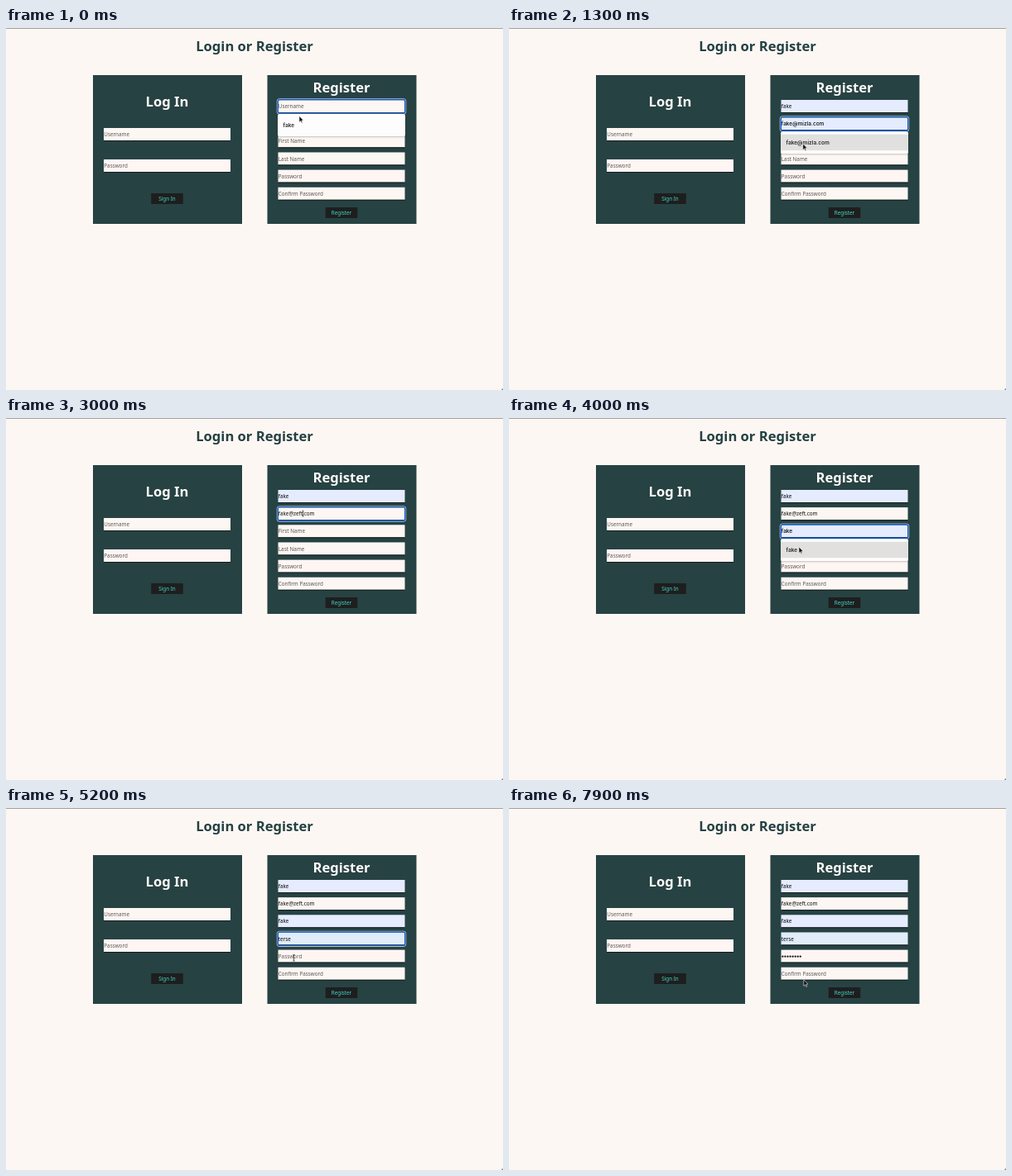
Animation, 600 px wide and 438 px high, one loop 8 s. Source, as an HTML page with a canvas:

```html
<!DOCTYPE html>
<html lang="en">
<head>
<meta charset="utf-8">
<title>Login or Register</title>
<style>
  html, body { margin: 0; width: 100%; height: 100%; overflow: hidden; background: #fdf7f4; }
  canvas { display: block; width: 600px; height: 438px; }
</style>
</head>
<body>
<canvas id="stage" width="600" height="438"></canvas>
<script>
const ctx = document.getElementById('stage').getContext('2d');
const LOOP = 8000, TICK = 100;
const PAGE = '#fdf7f4', PANEL = '#274243', AUTOFILL = '#e5ecfe';
const BODY = '"Noto Sans", "Open Sans", sans-serif';
const SYSTEM = 'Inter, Roboto, sans-serif';
const HEADING = `bold 16.6px ${BODY}`;
const FIELD_W = 153, FIELD_X = 328.5;

const NAME = 'fake', SURNAME = 'terse';
const OLD_DOMAIN = 'mizla', NEW_DOMAIN = 'zeft';

const LABELS = ['Username', 'Email', 'First Name', 'Last Name', 'Password', 'Confirm Password'];
const midOf = i => 94.5 + 21.15 * i;

// Suggestion lists: opened, hovered, accepted.
const MENUS = [
  { field: 0, open: 0, hover: 200, accept: 400, text: NAME },
  { field: 1, open: 800, hover: 1200, accept: 1500, text: `${NAME}@${OLD_DOMAIN}.com` },
  { field: 2, open: 3600, hover: 4000, accept: 4200, text: NAME },
  { field: 3, open: 4600, hover: 5000, accept: 5100, text: SURNAME }
];
const FOCUS = [[0, 0], [700, 1], [3500, 2], [4500, 3], [6000, 4], [7700, -1]];
const DELETE_TIMES = [1800, 1900, 2000, 2100, 2200];
const TYPE_TIMES = [2700, 2700, 2800, 3000];
const DOT_TIMES = [6100, 6200, 6300, 6400, 6500, 6700, 7000, 7200];

// Pointer runs as [time, x, y]; the pointer is hidden between runs.
const RUNS = [
  [[0, 354, 106.5], [200, 354, 115], [400, 354, 115], [700, 355, 114],
   [900, 355, 122], [1300, 354.8, 140], [1500, 355, 140], [1800, 368, 116], [1899, 368, 116]],
  [[3300, 366, 119], [3500, 350, 137], [3600, 350, 139], [3900, 350, 139],
   [4000, 350, 156], [4200, 350, 156], [4500, 348, 158], [4700, 347.8, 162],
   [4800, 347.5, 167], [5000, 347, 179], [5100, 347, 180], [5300, 348, 182],
   [5500, 348, 182], [5700, 349.5, 186], [6099, 349.5, 186]],
  [[7400, 349.5, 186], [7700, 356, 211], [7900, 355.8, 207.9], [8000, 355.8, 207.9]]
];

const count = (times, t) => times.filter(x => x <= t).length;

function pointerAt(t) {
  const run = RUNS.find(r => t >= r[0][0] && t <= r[r.length - 1][0]);
  if (!run) return null;
  const i = Math.max(1, run.findIndex(p => p[0] >= t));
  const [t0, x0, y0] = run[i - 1], [t1, x1, y1] = run[i];
  const k = (t - t0) / (t1 - t0);
  return { x: x0 + (x1 - x0) * k, y: y0 + (y1 - y0) * k };
}

function rect(x, y, w, h, color) {
  ctx.fillStyle = color;
  ctx.fillRect(x, y, w, h);
}

function outline(x, y, w, h, radius, color, width) {
  ctx.beginPath();
  ctx.roundRect(x, y, w, h, radius);
  ctx.strokeStyle = color;
  ctx.lineWidth = width;
  ctx.stroke();
}

function text(str, x, y, font, color, align = 'left') {
  ctx.font = font;
  ctx.fillStyle = color;
  ctx.textAlign = align;
  ctx.fillText(str, x, y);
}

function drawField(x, mid, label, { value = '', fill, preview = false, focused = false } = {}) {
  const top = mid - 7.5;
  rect(x, top, FIELD_W, 15, fill || (label.startsWith('Pass') ? '#fff6f4' : '#fdf7f3'));
  rect(x, top + 15, FIELD_W, 1, '#141c1c');
  if (focused) {
    outline(x - 1.2, top - 1.2, FIELD_W + 2.4, 18.2, 2.5, '#e9eef5', 0.8);
    outline(x - 0.2, top - 0.3, FIELD_W + 0.4, 16.2, 1.8, '#155bc8', 1.4);
  }
  const font = preview ? `500 6.5px ${SYSTEM}` : `6.3px ${BODY}`;
  text(value || label, x + 0.3, mid + 2.6, font, value ? '#0b0b0b' : '#5b5856');
}

function drawButton(label, mid, y) {
  rect(mid - 19.3, y, 38.6, 13, '#1e1e1f');
  text(label, mid, y + 8.9, `6.3px ${BODY}`, '#3fdac6', 'center');
}

function drawCaret(x, mid) {
  rect(x, mid - 4, 0.8, 8, '#111');
}

function drawDots(n) {
  ctx.fillStyle = '#151515';
  for (let i = 0; i < n; i++) {
    ctx.beginPath();
    ctx.arc(330.4 + 3.05 * i, midOf(4) + 0.6, 1.15, 0, 7);
    ctx.fill();
  }
}

function drawMenu(menu, hovered) {
  const mid = midOf(menu.field);
  ctx.save();
  ctx.shadowColor = 'rgba(0,0,0,.35)';
  ctx.shadowBlur = 2;
  ctx.shadowOffsetY = 0.5;
  ctx.beginPath();
  ctx.roundRect(328, mid + 9.5, 154, 27, 2);
  ctx.fillStyle = '#fdfdfd';
  ctx.fill();
  ctx.restore();
  if (hovered) rect(328, mid + 13, 154, 19.5, '#e1e0df');
  text(menu.text, 334.5, mid + 25, `600 6.5px ${SYSTEM}`, '#2b2b2b');
}

function drawArrow({ x, y }) {
  ctx.beginPath();
  [[0, 0], [0, 7.4], [1.7, 5.9], [2.9, 8.5], [4, 8], [2.9, 5.4], [5, 5.2]]
    .forEach(([dx, dy]) => ctx.lineTo(x + dx, y + dy));
  ctx.closePath();
  ctx.fillStyle = '#0c0c0c';
  ctx.fill();
  ctx.strokeStyle = '#efefef';
  ctx.lineWidth = 0.6;
  ctx.stroke();
}

function drawBeam({ x, y }) {
  rect(x - 0.4, y - 3.5, 0.8, 7.5, '#333');
  rect(x - 1.4, y - 4, 2.8, 0.7, '#555');
  rect(x - 1.4, y + 3.7, 2.8, 0.7, '#555');
}

function fieldState(i, t, focus) {
  const state = { focused: focus === i };
  const menu = MENUS.find(m => m.field === i);
  if (menu && t >= menu.hover) {
    state.value = menu.text;
    state.preview = t < menu.accept;
    state.fill = i === 3 ? '#e1ecfa' : AUTOFILL;
  }
  if (i === 1 && t >= DELETE_TIMES[0]) {
    const left = OLD_DOMAIN.length - count(DELETE_TIMES, t);
    const domain = OLD_DOMAIN.slice(0, left) + NEW_DOMAIN.slice(0, count(TYPE_TIMES, t));
    state.caretText = `${NAME}@${domain}`;
    state.value = `${state.caretText}.com`;
    state.fill = null;
  }
  return state;
}

function drawPage() {
  rect(0, 0, 600, 438, PAGE);
  rect(0, 0, 600, 0.7, '#7d7b7a');
  rect(598.5, 436.5, 1.5, 1.5, '#777');
  text('Login or Register', 300, 28, HEADING, '#244142', 'center');
  rect(105, 57, 180, 180, PANEL);
  rect(315.5, 57, 180, 180, PANEL);
  text('Log In', 194.5, 95, HEADING, '#fdfaf8', 'center');
  text('Register', 405, 78, HEADING, '#fdfaf8', 'center');
  drawField(118, 128.5, 'Username');
  drawField(118, 166.5, 'Password');
  drawButton('Sign In', 194.5, 200);
  drawButton('Register', 405, 217);
}

function draw(t) {
  drawPage();
  const focus = FOCUS.filter(f => f[0] <= t).pop()[1];
  const dots = count(DOT_TIMES, t);

  LABELS.forEach((label, i) => {
    const state = fieldState(i, t, focus);
    const masked = i === 4 && dots > 0;
    if (masked) state.value = ' ';
    drawField(FIELD_X, midOf(i), label, state);
    if (masked) drawDots(dots);
    if (state.focused && state.caretText) {
      drawCaret(FIELD_X + 0.4 + ctx.measureText(state.caretText).width, midOf(i));
    }
  });
  if (focus === 4) drawCaret(329 + 3.05 * dots, midOf(4));

  const menu = MENUS.find(m => t >= m.open && t < m.accept);
  if (menu) drawMenu(menu, t >= menu.hover);

  const pointer = pointerAt(t);
  if (!pointer) return;
  const overMenu = menu && pointer.y > midOf(menu.field) + 9.5;
  const overField = LABELS.some((_, i) => Math.abs(pointer.y - midOf(i)) < 7.5);
  (overField && !overMenu ? drawBeam : drawArrow)(pointer);
}

function frame(now) {
  draw(Math.floor((now % LOOP) / TICK) * TICK);
  requestAnimationFrame(frame);
}
requestAnimationFrame(frame);
</script>
</body>
</html>
```
